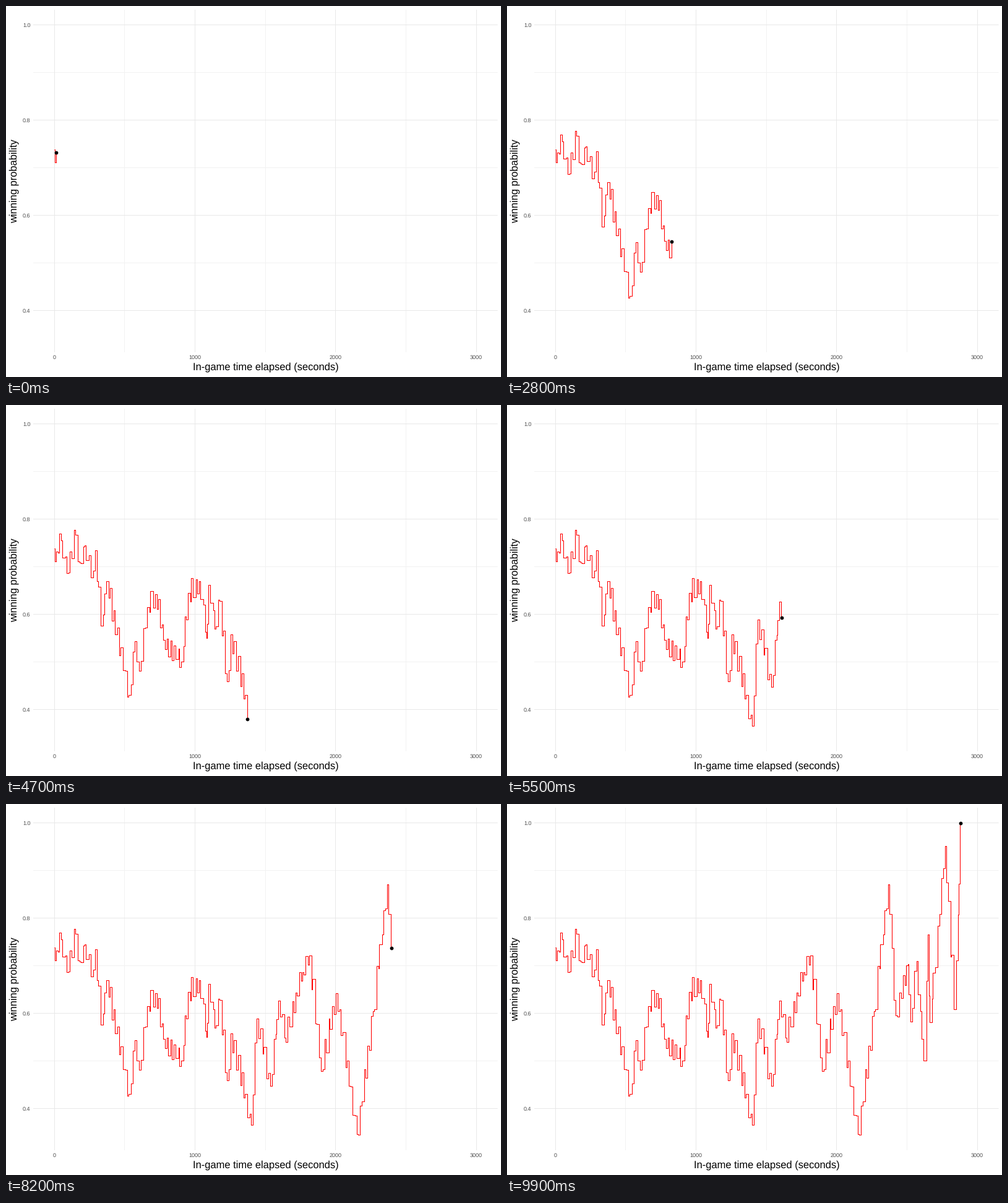
A matplotlib script that plays this animation: 800 px wide and 600 px high, repeating every 10000 ms.

```python
import matplotlib.pyplot as plt
import numpy as np
from matplotlib.animation import FuncAnimation

FRAMES, GAME = 100, 2880
PT = 0.72  # points per pixel at 100 dpi

plt.rcParams.update({
    "font.family": "Liberation Sans",
    "text.hinting": "none",
    "path.simplify": False,
    "path.snap": False,
    "toolbar": "None",
})

# Turning points of the match: (seconds, winning probability)
TURNS = [
    (0, .737), (14, .731), (50, .755), (90, .686), (150, .766), (181, .708),
    (217, .744), (261, .677), (293, .734), (332, .575), (371, .668),
    (530, .43), (573, .542), (602, .48), (660, .614), (717, .641),
    (777, .545), (905, .5), (953, .644), (1031, .669), (1084, .549),
    (1097, .661), (1141, .569), (1174, .627), (1229, .458), (1256, .557),
    (1401, .365), (1441, .588), (1535, .447), (1595, .626), (1640, .548),
    (1765, .686), (1813, .721), (1896, .478), (2003, .641), (2152, .345),
    (2267, .604), (2367, .87), (2420, .594), (2509, .702), (2525, .581),
    (2570, .709), (2620, .5), (2652, .765), (2664, .58), (2772, .95),
    (2834, .607), (2866, .806), (GAME, 1),
]


def px(seconds):
    return 78.2 + seconds * 750 / 3300


def py(prob):
    return 30.5 + (1 - prob) * 769.5


def crisp(v):
    """Centre of the pixel that holds v."""
    return np.floor(v) + 0.5


def play(turns, pace=13):
    """Fill each swing with possessions that gain and lose in turn."""
    rng = np.random.default_rng(7)
    events = []
    for (t0, p0), (t1, p1) in zip(turns, turns[1:]):
        n = max(2, round((t1 - t0) / pace))
        events.append((t0, p0))
        for j in range(1, n):
            f = (j + rng.uniform(-0.35, 0.35)) / n
            swing = (-1) ** j * rng.uniform(0.008, 0.025)
            events.append((t0 + f * (t1 - t0), p0 + f * (p1 - p0) + swing))
    return np.array(events + [turns[-1]]).T


times, probs = play(TURNS)
xs, ys = px(times), py(probs)

fig = plt.figure(figsize=(8, 6), dpi=100, facecolor="white")
ax = fig.add_axes([0, 0, 1, 1])
ax.set(xlim=(0, 800), ylim=(600, 0))
ax.axis("off")


def grid(seconds, levels, color):
    style = dict(color=color, lw=PT, solid_capstyle="butt", zorder=1)
    for s in seconds:
        ax.plot([crisp(px(s))] * 2, [6, 560], **style)
    for p in levels:
        ax.plot([44, 794.5], [crisp(py(p))] * 2, **style)


def label(x, y, text, size, color, ha="center", angle=0):
    ax.text(x, y, text, fontsize=size * PT, color=color, ha=ha,
            va="baseline", rotation=angle, rotation_mode="anchor")


x_ticks, y_ticks = (0, 1000, 2000, 3000), (1.0, 0.8, 0.6, 0.4)
grid((500, 1500, 2500), (0.9, 0.7, 0.5), "#f2f2f2")
grid(x_ticks, y_ticks, "#e8e8e8")

for s in x_ticks:
    label(px(s), 571, f"{s}", 9, "#4d4d4d")
for p in y_ticks:
    label(39.4, py(p) + 3.4, f"{p:.1f}", 9, "#4d4d4d", ha="right")
label(419.4, 588, "In-game time elapsed (seconds)", 16.5, "black")
label(17.2, 283, "winning probability", 16.5, "black", angle=90)

line, = ax.plot([], [], color="red", lw=1.07 * PT, drawstyle="steps-post",
                solid_capstyle="butt", zorder=2)
dot, = ax.plot([], [], "o", color="black", ms=5.8 * PT, mew=0, zorder=3)


def draw(i):
    # Reveal every event whose time rounds to this step or an earlier one
    limit = (i + 0.5) * GAME / (FRAMES - 1)
    n = np.searchsorted(times, limit, side="right")
    line.set_data(crisp(xs[:n]), crisp(ys[:n]))
    dot.set_data(xs[n - 1:n], ys[n - 1:n])
    return line, dot


anim = FuncAnimation(fig, draw, frames=FRAMES, interval=100, repeat=True,
                     repeat_delay=0, blit=False)
plt.show()
```
